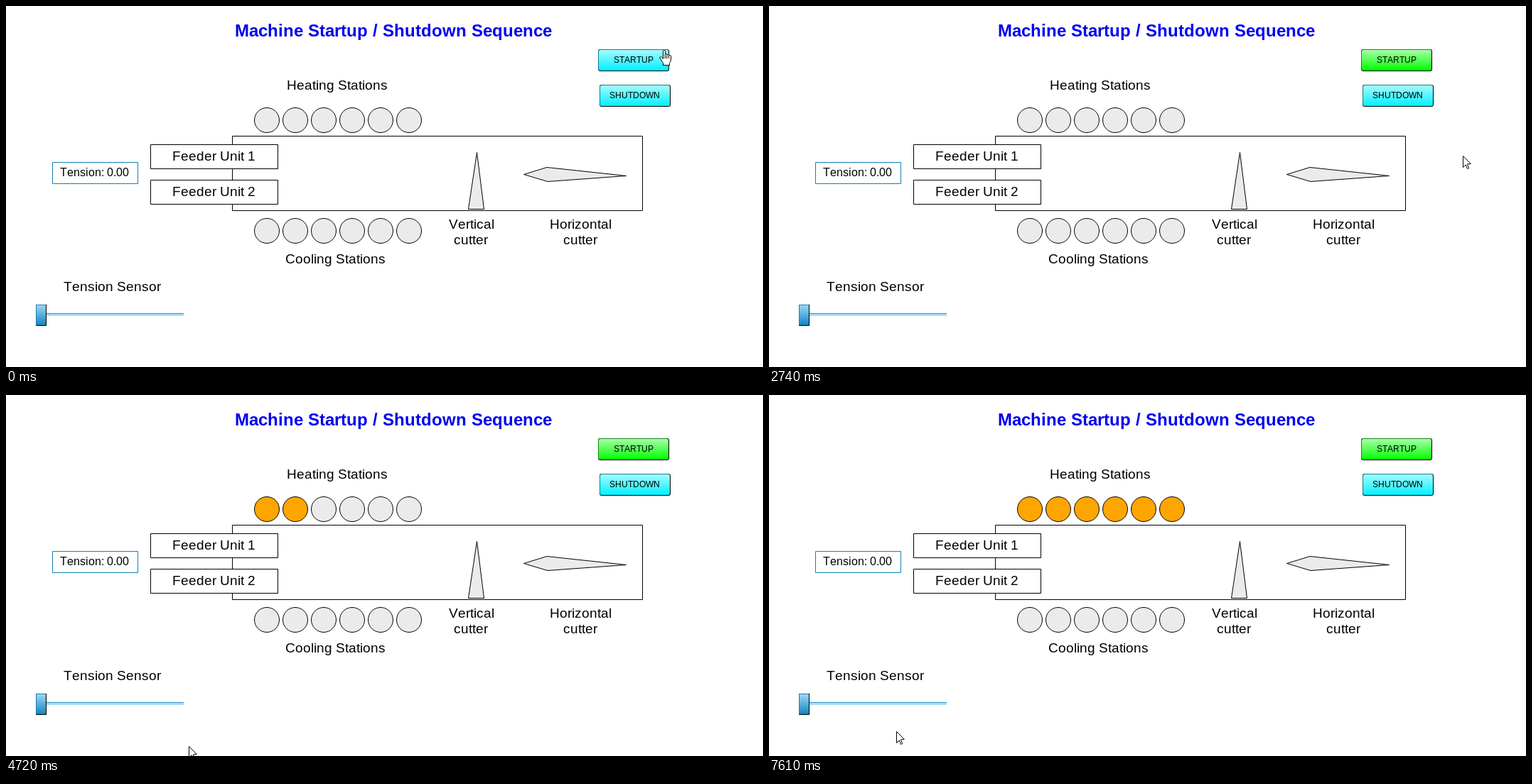
Recreate the animation shown at these times as an HTML page with a canvas. Size 1065x509 px, loop 8 s.

```html
<!DOCTYPE html>
<html lang="en">
<head>
<meta charset="utf-8">
<title>Machine Startup / Shutdown Sequence</title>
<style>
  html, body { margin: 0; width: 100%; height: 100%; overflow: hidden; background: #fff; }
  canvas { display: block; }
</style>
</head>
<body>
<canvas id="stage" width="1065" height="509"></canvas>
<script>
const ctx = document.getElementById('stage').getContext('2d');
const LOOP = 8000;
const PRESS = 1980, RELEASE = 2300;
const HEAT_START = 3030, HEAT_EVERY = 916;
const GRAY = '#ebebeb', ORANGE = '#ffa500';

const linear = u => u;
const easeOut = u => u * (2 - u);

// Each glide is a quadratic curve from wherever the pointer was
const GLIDES = [
  { from: 60, until: 220, bend: [905, 52], to: [890, 66] },
  { from: 550, until: 550, to: [891, 68] },
  { from: 910, until: 1040, to: [891, 74] },
  { from: 2300, until: 2740, bend: [1025, 115], to: [976, 211] },
  { from: 3740, until: 4190, bend: [983, 270], to: [975, 352] },
  { from: 4190, until: 4540, bend: [900, 495], to: [440, 495] },
  { from: 4580, until: 5070, bend: [200, 505], to: [179, 474], ease: easeOut }
];

function pointerAt(t) {
  let pos = [925, 62];
  for (const { from, until, to, bend = to, ease = linear } of GLIDES) {
    if (t < from) break;
    const u = t >= until ? 1 : ease((t - from) / (until - from));
    const v = 1 - u;
    pos = pos.map((p, i) => Math.round(v * v * p + 2 * u * v * bend[i] + u * u * to[i]));
  }
  return pos;
}

function trace(points) {
  ctx.beginPath();
  for (const [x, y] of points) ctx.lineTo(x, y);
}

function paint(fill) {
  ctx.fillStyle = fill;
  ctx.fill();
  ctx.stroke();
}

function polygon(points, fill) {
  trace(points);
  ctx.closePath();
  paint(fill);
}

function box(x, y, w, h, stroke = '#000') {
  ctx.beginPath();
  ctx.rect(x + .5, y + .5, w - 1, h - 1);
  ctx.strokeStyle = stroke;
  paint('#fff');
}

function fade(y0, y1, top, bottom) {
  const g = ctx.createLinearGradient(0, y0, 0, y1);
  g.addColorStop(0, top);
  g.addColorStop(1, bottom);
  return g;
}

// Text set with whole-pixel advances
function text(str, x, y, size = 19, color = '#000', weight = '') {
  ctx.font = `${weight} ${size}px "Liberation Sans", Arial, sans-serif`;
  ctx.fillStyle = color;
  for (const ch of str) {
    ctx.fillText(ch, x, y);
    x += Math.round(ctx.measureText(ch).width);
  }
}

function plate(x, y, w, h, r, fill) {
  ctx.beginPath();
  ctx.roundRect(x, y, w, h, r);
  ctx.fillStyle = fill;
  ctx.fill();
}

function button(label, x, y, inset, [top, bottom, edge], shift = 0) {
  plate(x, y, 100, 31, 3, '#000');
  plate(x, y, 99, 30, 3, edge);
  plate(x + 1, y + 1, 98, 29, 2, fade(y + 1, y + 30, top, bottom));
  text(label, x + inset + shift, y + 19 + shift, 12);
}

const CYAN = ['#a6fbff', '#00f0ff', '#12808c'];
const PALE = ['#ccffcc', '#80ff80', '#2c8c2c'];
const GREEN = ['#a8ffa8', '#00ff00', '#128c12'];

function lamps(y, lit) {
  for (let i = 0; i < 6; i++) {
    ctx.beginPath();
    ctx.arc(367 + 40 * i, y, 17.5, 0, Math.PI * 2);
    paint(i < lit ? ORANGE : GRAY);
  }
}

function slider() {
  plate(42, 433, 208, 1, 0, '#3594c8');
  plate(42, 434, 208, 3, 0, '#a4dcfc');
  plate(42, 421, 15, 30, 0, '#000');
  plate(42, 421, 14, 29, 0, '#1a7fb4');
  plate(43, 422, 13, 28, 0, fade(422, 450, '#9ad6f6', '#1584c0'));
}

function arrow() {
  polygon([[.5, .5], [.5, 16.5], [4.2, 13], [6.5, 18.5], [8.7, 17.6], [6.4, 12], [11.3, 11.5]], '#fff');
}

function hand() {
  for (let i = 0; i < 4; i++) {
    const top = i ? 4.5 + i : .5;
    ctx.beginPath();
    ctx.roundRect(5.5 + 2.7 * i, top, 3, 14 - top, 1.2);
    paint('#fff');
  }
  trace([[5.5, 12.5], [2.5, 9.5], [.5, 10.5], [5.5, 18.5], [5.5, 21.5],
    [14.5, 21.5], [14.5, 18.5], [16.5, 14.5], [16.5, 11.5]]);
  paint('#fff');
}

function pointer(x, y) {
  const overButton = x >= 833 && x < 934 && y >= 55 && y < 92;
  ctx.save();
  ctx.translate(overButton ? x - 6 : x, y);
  overButton ? hand() : arrow();
  ctx.restore();
}

function draw(t) {
  ctx.fillStyle = '#fff';
  ctx.fillRect(0, 0, 1065, 509);

  text('Machine Startup / Shutdown Sequence', 322, 43, 24, '#0000f0', 'bold');
  text('Heating Stations', 395, 118);
  text('Cooling Stations', 393, 363);

  box(318, 183, 578, 106);
  for (const unit of [1, 2]) {
    const y = 145 + 50 * unit;
    box(203, y, 180, 35);
    text('Feeder Unit ' + unit, 234, y + 23);
  }
  lamps(161, Math.max(0, Math.floor((t - HEAT_START) / HEAT_EVERY) + 1));
  lamps(317, 0);

  polygon([[662.5, 206.5], [672.5, 286.5], [650.5, 286.5]], GRAY);
  polygon([[728.5, 237.5], [761, 227.5], [872.5, 239.5], [762, 247.5]], GRAY);
  text('Vertical', 623, 314);
  text('cutter', 630, 336);
  text('Horizontal', 765, 314);
  text('cutter', 784, 336);

  box(65, 220, 121, 31, '#1082b8');
  text('Tension: 0.00', 76, 240, 16);
  text('Tension Sensor', 81, 402);
  slider();

  const pressed = t >= PRESS && t < RELEASE;
  button('STARTUP', 833, 61, 22, pressed ? PALE : t < PRESS ? CYAN : GREEN, pressed ? 1 : 0);
  button('SHUTDOWN', 835, 111, 14, CYAN);

  ctx.strokeStyle = '#000';
  pointer(...pointerAt(t));
}

const began = performance.now();
function tick() {
  draw((performance.now() - began) % LOOP);
  requestAnimationFrame(tick);
}
tick();
</script>
</body>
</html>
```
